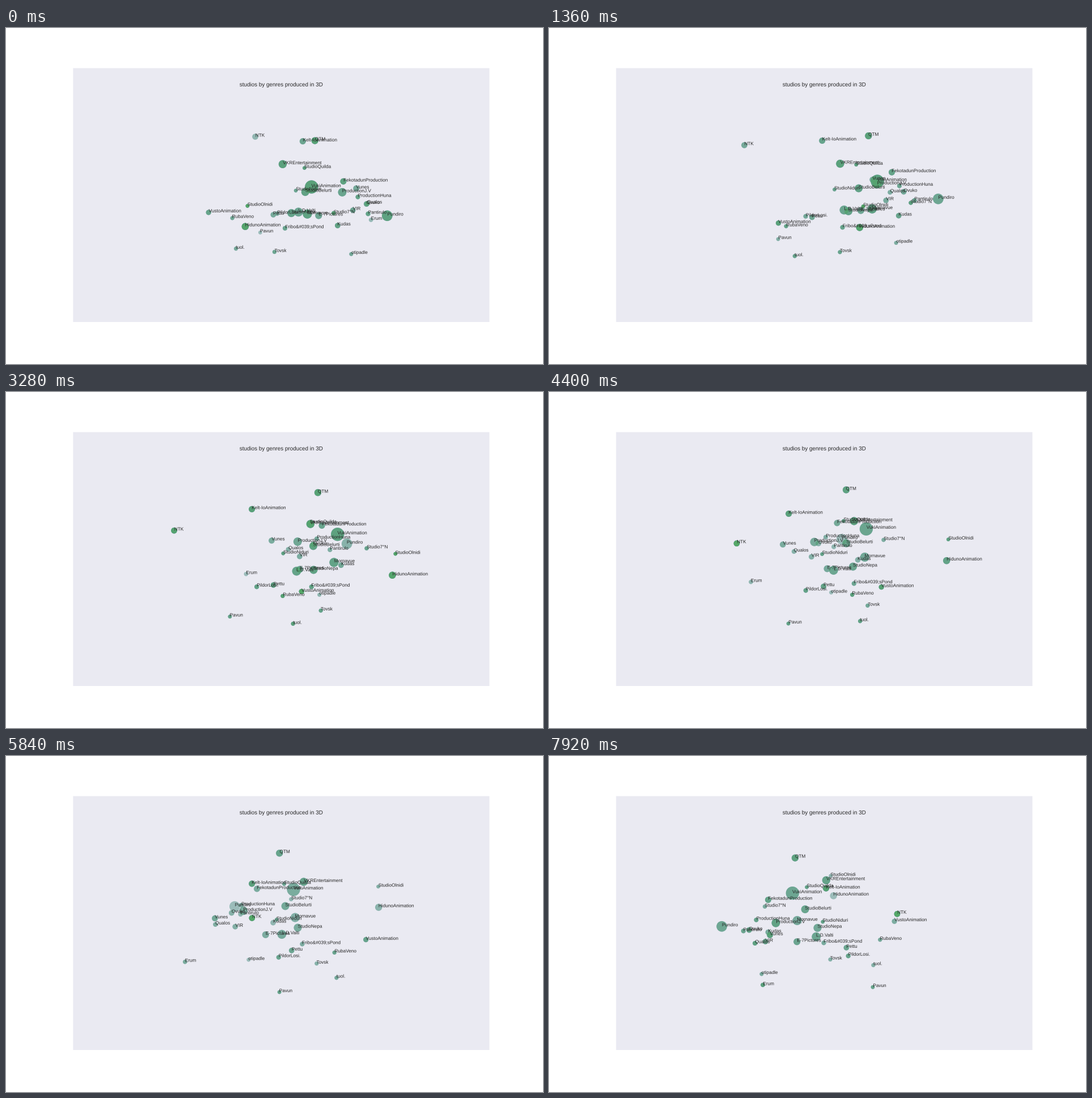
A matplotlib script that plays this animation: 947x592 px, repeating every 8000 ms.

```python
import numpy as np
import matplotlib.pyplot as plt
from matplotlib.animation import FuncAnimation
from matplotlib.collections import PathCollection
from matplotlib.colors import to_rgb
from matplotlib.patches import Rectangle
from matplotlib.textpath import TextPath
from matplotlib.transforms import IdentityTransform

WIDTH, HEIGHT, DPI = 947, 592, 100
PAGE_W, PAGE_H = 1152, 720         # layout units, scaled down to the stage
ZOOM = WIDTH / PAGE_W
FRAMES, INTERVAL = 100, 80
DEG_PER_FRAME = 2
ELEVATION = np.radians(25)
CAMERA = 10                        # distance from the centre of the cloud
CENTER = np.array([602.4, 350.85])
SCALE = np.array([4825.9, -2938.4])
BLUE, GREEN, PANEL, INK = "#4C72B0", "#55A868", "#EAEAF2", "#262626"
TITLE = "studios by genres produced in 3D"

# name, right, toward the viewer, up (thousandths), marker radius in pixels
STUDIOS = [
    ("E-7Pictures", 142, 39, -175, 6),
    ("VIR", 295, 18, -141, 4.8),
    ("Erum", 388, -247, -350, 3.8),
    ("Kudas", 223, 218, -167, 4.8),
    ("Fribo&#039;sPond", -8, 113, -241, 4.1),
    ("NTK", -145, -477, 235, 5.3),
    ("RubaVeno", -244, 16, -206, 3.6),
    ("Qualos", 361, -44, -116, 4.1),
    ("Ovuko", 353, 73, -64, 4.9),
    ("L.D.Valti", 52, 37, -147, 7.8),
    ("VustoAnimation", -346, 113, -113, 4.6),
    ("Mornavue", 90, 201, -83, 8),
    ("HidunoAnimation", -177, 489, -40, 6.2),
    ("QTM", 121, 121, 455, 6.1),
    ("ProductionJ.V", 246, 15, 3, 7.4),
    ("ProductionHuna", 313, 94, 2, 4),
    ("Pantirulo", 358, 150, -106, 4.1),
    ("Pavun", -123, -241, -454, 3.4),
    ("Pettu", -61, -52, -212, 4.8),
    ("Kelt-IoAnimation", 71, -166, 329, 5.5),
    ("PildorLosi.", -44, -130, -240, 4.1),
    ("Studio7°N", 202, 335, -11, 3.7),
    ("StudioNepa", 20, 118, -116, 7),
    ("StudioQuilda", 77, 93, 231, 3.3),
    ("StudioOlnidi", -166, 498, 124, 3.3),
    ("StudioNiduri", 40, -22, -1, 3.3),
    ("StudioBelurti", 81, 108, 48, 6.9),
    ("Pundiro", 439, 219, -88, 9.3),
    ("VKREntertainment", -18, 107, 267, 7.1),
    ("FekotadunProduction", 247, 125, 140, 5.5),
    ("VukiAnimation", 107, 213, 137, 11.6),
    ("Vunes", 312, -114, -26, 5.3),
    ("Tovsk", -55, 162, -410, 3.6),
    ("tuol.", -229, 60, -436, 3.6),
    ("otipadle", 289, 112, -454, 3.5),
]
names = [row[0] for row in STUDIOS]
right, toward, up, radius = np.array([row[1:] for row in STUDIOS]).T
right, toward, up = right / 1000, toward / 1000, up / 1000


def project(angle):
    """Page positions and depth-shaded alphas after turning by angle."""
    x = right * np.cos(angle) + toward * np.sin(angle)
    front = toward * np.cos(angle) - right * np.sin(angle)
    y = up * np.cos(ELEVATION) - front * np.sin(ELEVATION)
    near = 1 / (CAMERA - front * np.cos(ELEVATION) - up * np.sin(ELEVATION))
    points = CENTER + SCALE * np.column_stack([x, y]) * near[:, None]
    alpha = 0.3 + 0.7 * (near - near.min()) / np.ptp(near)
    return points, alpha


plt.rcParams["font.family"] = "Liberation Sans"
fig = plt.figure(figsize=(WIDTH / DPI, HEIGHT / DPI), dpi=DPI, facecolor="white")
ax = fig.add_axes([0, 0, 1, 1])
ax.set(xlim=(0, PAGE_W), ylim=(PAGE_H, 0))
ax.axis("off")
ax.add_patch(Rectangle((144, 86), 893, 544, facecolor=PANEL, linewidth=0,
                       snap=False))


def add_texts(strings, size, points):
    """Smooth, subpixel-placed text whose baselines start at the points."""
    paths = [TextPath((0, 0), text, size=size * ZOOM) for text in strings]
    texts = PathCollection(paths, offsets=points, offset_transform=ax.transData,
                           transform=IdentityTransform(), facecolors=INK,
                           edgecolors="none", linewidths=0, zorder=3)
    ax.add_collection(texts, autolim=False)
    return texts


title_width = TextPath((0, 0), TITLE, size=12).get_extents().width
add_texts([TITLE], 12, [(round(590.4 - title_width / 2), 125)])

start, _ = project(0)
layers = [(to_rgb(color), ax.scatter(*start.T, s=(2 * radius * 72 / DPI) ** 2,
                                     color=color, linewidths=0, zorder=2))
          for color in (BLUE, GREEN)]
labels = add_texts(names, 10, np.round(start))


def update(frame):
    points, alpha = project(np.radians(DEG_PER_FRAME * frame))
    for rgb, dots in layers:
        dots.set_offsets(points)
        dots.set_facecolor([(*rgb, a) for a in alpha])
    labels.set_offsets(np.round(points))
    return [dots for _, dots in layers] + [labels]


animation = FuncAnimation(fig, update, frames=FRAMES, interval=INTERVAL,
                          init_func=lambda: update(0), repeat=True,
                          repeat_delay=0)
plt.show()
```
